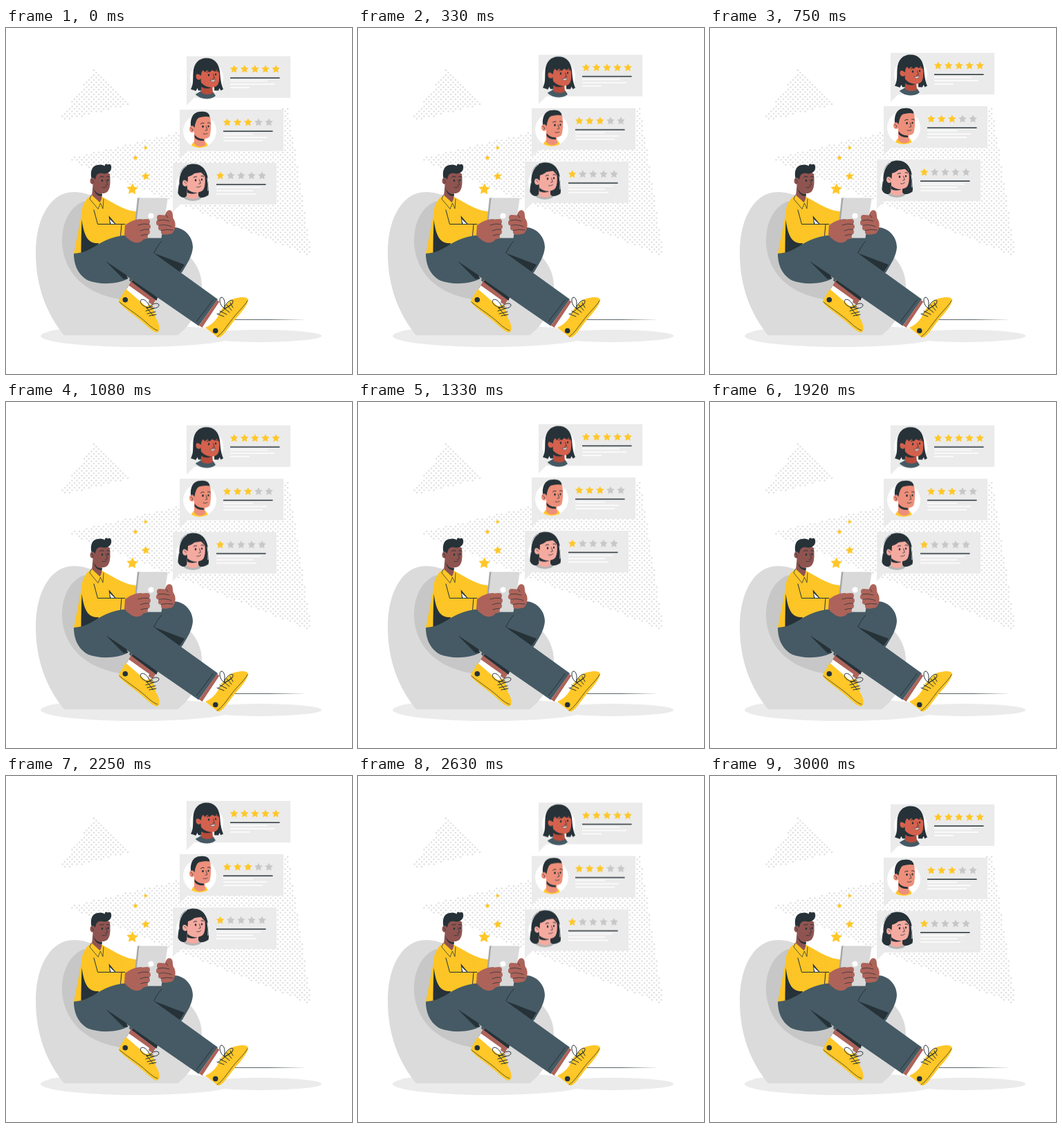
Recreate the animation shown at these times as an HTML page. Size 500 by 500 pixels, loop 3.04 s.

```html
<!DOCTYPE html>
<html lang="en">
<head>
<meta charset="utf-8">
<title>Customer reviews</title>
<style>
html, body { margin: 0; width: 100%; height: 100%; overflow: hidden; background: #fff; }
svg { display: block; width: 100vw; height: 100vh; }
.ink { fill: #263238; }
.pants { fill: #455a64; }
.sun { fill: #ffc727; }
.skin { fill: #ad6359; }
.face { fill: #8f5450; }
.line { fill: none; stroke: #263238; stroke-width: 1; stroke-linecap: round; stroke-linejoin: round; }
.thin { stroke-width: .75; }
.fingers { fill: none; stroke: #ad6359; stroke-width: 8; stroke-linecap: round; }
.dots { fill: none; stroke: #e0e0e0; stroke-width: 2.7; stroke-linecap: round; }
</style>
</head>
<body>
<svg viewBox="0 0 500 500" xmlns="http://www.w3.org/2000/svg">
  <defs>
    <pattern id="plaid" width="3" height="3" patternUnits="userSpaceOnUse">
      <path d="M0 .5H3M.5 0V3" stroke="#d99f10" stroke-width=".5" opacity=".22"/>
    </pattern>
  </defs>

  <g id="dots"></g>
  <ellipse cx="190" cy="445" rx="140" ry="16" fill="#ebebeb"/>
  <ellipse cx="367" cy="445" rx="89" ry="9" fill="#ebebeb"/>
  <path class="ink" d="M326 421.1L380 421L434 421.400L380 421.800L326 421.700Z"/>

  <g id="cards"></g>

  <!-- beanbag -->
  <path fill="#dbdbdb" d="M84 444C60 415 43 375 43 325C43 272 66 237 98 237C150 237 185 300 230 310C262 318 284 345 283 375C282 402 268 430 248 444Z"/>
  <path fill="#c7c7c7" d="M113 250C88 260 80 288 81 312C84 352 112 386 172 393L205 360Z"/>

  <!-- shirt -->
  <path id="torso" class="sun" d="M123 242C112 249 109 261 108.500 273L98 326L175 322L190 290L189 265C175 265 160 256 139 244Z"/>
  <path d="M123 242C112 249 109 261 108.500 273L98 326L175 322L190 290L189 265C175 265 160 256 139 244Z" fill="url(#plaid)"/>
  <path class="ink" d="M109.500 277C109 295 108.500 310 108.500 326L130 320L134 311C119 312 113 302 109.500 277Z"/>
  <path class="ink" d="M148.500 271L150 283H158.500Z"/>
  <path fill="#fff" d="M149.800 276L151.500 283H157Z"/>
  <path class="line" d="M127 263L132.500 283.500H172M167 284L165.500 301"/>

  <!-- head -->
  <path class="face" d="M126 222L124 243C127 250 134 256 138 250L139 236Z"/>
  <path class="ink" d="M126.500 231C129 238 134 241 139 240L138.500 243C132 243 128 239 126.500 231Z"/>
  <path class="face" d="M128 211C134 207 146 207 150 211C151 222 151 231 147 236C141 242 132 239 128 230Z"/>
  <ellipse class="face" cx="125.500" cy="221" rx="4" ry="5"/>
  <path class="ink" d="M123.500 217C121.500 208 124 199 132 198C137 196.500 141 198 143 199.500C142 196 146 195.500 147.500 198C150 194.500 154 199 151.500 205C149 210.500 143 211 139 210C132 209 130 213 129 219Q126 215 123.500 217Z"/>
  <path class="line thin" d="M124 219L126.500 222.500L125 224M144.500 219L146.500 226.500L143.500 227.500M139 230.500Q143 231.500 145.500 229.500"/>
  <path class="line" d="M136 215.500Q138.500 213.500 141 215M145.500 215Q148 213.500 150 215.500M147 201Q149 200 148 197"/>
  <ellipse class="ink" cx="139" cy="220.500" rx="1.200" ry="1.700"/>
  <ellipse class="ink" cx="147.500" cy="219.800" rx="1.100" ry="1.600"/>
  <path class="sun" d="M123.500 241L121 247L133 261.500L136.500 253Z"/>
  <path class="sun" d="M139.500 244L135 254L139 261L141.500 250Z"/>
  <path class="line thin" d="M123.500 241L121 247L133 261.500L136.500 253L140 261L141 247"/>

  <!-- far leg and foot -->
  <path class="pants" d="M196 304C212 296 225 290 240 288C256 287 270 300 270 317C269 330 262 340 255 352L216 393L178 365Z"/>
  <path class="ink" d="M213 325L258 342L250 354Z"/>
  <path class="skin" d="M183 362L218 390L212 400L175 376Z"/>
  <path class="ink" d="M184 363L219 389.500L217.500 394L181.500 367Z"/>
  <path fill="#fff" d="M177.500 372L207 393L204 403L172 382Z"/>
  <g id="shoeLeft">
    <path class="sun" d="M173 377L163 394C162 399 180 411 190 419C201 428 213 440 218 440C224 438 222 428 217 420C215 412 214 405 210 400L202 402Z"/>
    <path class="line thin" d="M164 396C178 407 195 418 203 426Q214 436 219 437"/>
    <circle class="ink" cx="172.300" cy="392.700" r="3.800"/>
    <path class="line" d="M207 404C199 404 192 397 195 393C199 390 205 396 208 403C212 397 220 397 221 400C221 405 213 406 208 404M203 405L212 402M202 409L214 405M204 413L216 410M207 416L217 414M203 404L213 416"/>
  </g>

  <!-- near leg and foot -->
  <path class="pants" d="M98 326C98 342 104 357 119 365C135 371 160 371 177 362L172 357L278.500 430.500L306 392L213 325L208 308C200 302 190 299 182 299C165 299 150 303 136 311C124 318 115 325 98 326Z"/>
  <path class="ink" d="M144 337L174 357L176 362L170 363Z"/>
  <path class="line" d="M214 325C217 318 221 312 225 308M299.500 392.500L275.500 424"/>
  <path class="skin" d="M305 393L309 396L284 433L279 430Z"/>
  <path fill="#fff" d="M308 396L317 403L296 438L284 432Z"/>
  <g id="shoeRight">
    <path class="sun" d="M288 433L306 447C311 449 318 438 325 429C334 417 350 402 350 392C347 387 335 389 327 392C321 395 317 402 311 407C306 419 300 428 288 433Z"/>
    <path class="line thin" d="M305 446C312 442 319 431 326 422C333 412 345 402 349 394"/>
    <circle class="ink" cx="302.700" cy="437.500" r="3.800"/>
    <path class="line" d="M315 405C309 401 307 391 311 389C316 389 317 398 315 405C317 398 325 391 328 394C329 400 320 404 315 405M309 409L319 414M314 404L323 411M319 400L326 408M324 397L328 404M305 413L315 417M306 414L327 398"/>
  </g>

  <!-- tablet and hands -->
  <path fill="#a6a6a6" d="M190 245.500H194L187 303H184Z"/>
  <path fill="#d9d9d9" d="M192.500 245.500H231.500Q234 245.500 233.500 248L224.500 303.500H186Z"/>
  <circle cx="209.500" cy="271.500" r="4" fill="#fff"/>
  <g id="handLeft">
    <path class="skin" d="M172 285C180 279 188 276 196 276L200 304C193 314 182 312 171 299Z"/>
    <path class="fingers" d="M192 281L204 280M192 288L205 287M192 294L204 294.500M192 301L201 301"/>
    <path class="line thin" d="M206 283.500Q198 282 191 285M207 291Q200 290 194 293M205 298.500Q200 298 195 300"/>
  </g>
  <g id="handRight">
    <path class="skin" d="M230 271C231 262 239 261 240.500 267L241.500 275C246 280 246 291 240 297L230 299Z"/>
    <path class="fingers" d="M222 274L235 275M221 281.500L238 282M224 288.500L239 288M228 294.500L237 293"/>
    <path class="line thin" d="M219 278Q228 276 236 279M221 285.500Q231 283 239 287M224 292.500Q232 290 241 292M231 270L234 274"/>
  </g>

  <g id="sparks"></g>
</svg>

<script>
const $ = id => document.getElementById(id);
const YELLOW = '#ffc727', GREY = '#c7c7c7', INK = '#263238';

function star(x, y, r, fill, turn = 0) {
  const pts = Array.from({ length: 10 }, (_, i) => {
    const a = (i * 36 - 90 + turn) * Math.PI / 180, d = i % 2 ? r * .5 : r;
    return (x + d * Math.cos(a)).toFixed(2) + ',' + (y + d * Math.sin(a)).toFixed(2);
  });
  return `<polygon points="${pts.join(' ')}" fill="${fill}" stroke="${fill}" stroke-width=".4" stroke-linejoin="round"/>`;
}

// Staggered dots whose centres lie inside a triangle
function dots([a, b, c]) {
  const side = (p, q, x, y) => (q[0] - p[0]) * (y - p[1]) - (q[1] - p[1]) * (x - p[0]) >= 0;
  const gap = 7;
  let d = '';
  for (let row = 0, y = 61; y < 334; y += gap / 2, row++)
    for (let x = 71 + (row % 2) * gap / 2; x < 446; x += gap)
      if (side(a, b, x, y) && side(b, c, x, y) && side(c, a, x, y))
        d += `M${x} ${y}h0`;
  return `<path class="dots" d="${d}"/>`;
}

const eyes = (x1, y1, x2, y2) => `
  <ellipse cx="${x1}" cy="${y1}" rx="1.3" ry="1.7" fill="${INK}"/>
  <ellipse cx="${x2}" cy="${y2}" rx="1.2" ry="1.6" fill="${INK}"/>
  <path class="line" d="M${x1 - 3} ${y1 - 4}q2-2 4.500-1M${x2 - 1} ${y2 - 5}q2.500-.8 3.800 .8"/>
  <path class="line thin" d="M${x2 - 3.5} ${y2}l1.800 5.500l-2.800 .8"/>`;

// Portraits, measured from the top left of their card; cy is the centre of the disc
const portraits = [
  { cy: 37.5, art: clip => `
   <path fill="${INK}" d="M9.500 24C10 10 18 2.500 28.500 2.500C40 2.500 46.500 10 48 22C49 34 50 41 53 47.500L49.500 49.500L47.500 46L46 49.500H40V40H25L24 49.500H17L15.500 46L13.500 50L6 47.500C10 41 9 33 9.500 24Z"/>
   <g clip-path="url(#${clip})">
     <path fill="#455a64" d="M11 56L21 50L38 51L42 57L34 63H20Z"/>
     <path fill="#b84c3c" d="M21 36L21 52Q28 58 38 53L37 42Z"/>
   </g>
   <path fill="#d4614d" d="M19 18L45 16C48 25 48 36 45 41C40 48 27 45 21 38Z"/>
   <ellipse cx="17.500" cy="29" rx="4" ry="5" fill="#d4614d"/>
   <path fill="${INK}" d="M11 26C11 10 20 4 31 5C42 6 46 14 47.500 24L43 19L41 22L37 20L33 23L30 20L26 23L24 20Q21 22 21 28Q16 24 11 26Z"/>
   <path fill="${INK}" d="M21 38Q27 45 36 45Q28 48.500 21 44Z"/>
   ${eyes(32, 27, 42, 26)}
   <path fill="#fff" stroke="${INK}" stroke-width=".5" d="M34 34.500Q38 35.500 41.500 33Q40.500 37 37.500 36.800Q35 36.500 34 34.500Z"/>` },

  { cy: 31, art: clip => `
   <g clip-path="url(#${clip})">
     <path class="sun" d="M13 58L20 46.500L38 47L44 58Z"/>
     <path fill="#ed8f7a" d="M21 34L21 49Q28 57 37 51L36 40Z"/>
   </g>
   <path fill="${INK}" d="M21.500 36Q26 42.500 35 42.500L35 45Q25 45.500 21.500 40Z"/>
   <path fill="#ed8f7a" d="M20 13C27 7 39 6 44 11C46 21 45 34 43 39C37 45 25 42 21 35Z"/>
   <ellipse cx="18" cy="28" rx="4" ry="5" fill="#ed8f7a"/>
   <path fill="${INK}" d="M16 24C15 11 20 3 30 3C38 2 43 5 43.500 10.500Q36 9 28 11.500Q23 14 21.500 26Q19 22 16 24Z"/>
   <path class="line thin" d="M16 26L19 29L17.500 31M34 35Q38 36 40 34.500"/>
   ${eyes(33.5, 24.5, 41.5, 24)}` },

  { cy: 31, art: clip => `
   <path fill="${INK}" d="M9 27C9 10 17 1.500 30 1.500C44 1.500 51 13 51.500 29C52 37 52.500 43 51.500 46.500Q46 50.500 39 50.500H18Q10 50 7.500 44C7.500 37 9 33 9 27Z"/>
   <path class="line" style="stroke:#fff" d="M9 31C8 20 12 9 20 4M50 22Q52 31 51 40"/>
   <g clip-path="url(#${clip})">
     <path fill="#b5b5b5" d="M14 53L20 47.500H37L42 53L34 60H20Z"/>
     <path fill="#f5aaa0" d="M21 36L20 49Q27 55 37 50L37 42Z"/>
   </g>
   <path fill="#f5aaa0" d="M19 17L45 13C48 24 47 34 44 39C38 45 26 43 21 37Z"/>
   <ellipse cx="18" cy="29" rx="4" ry="5" fill="#f5aaa0"/>
   <path fill="${INK}" d="M12 27C12 11 22 5 32 6C41 6 46 12 46.500 20Q41 12 35 11Q30 18 22 20L21.500 28Q17 22 12 27Z"/>
   <path fill="${INK}" d="M21 38Q27 43.500 36 43Q28 46.500 21 43Z"/>
   <path class="line thin" d="M16.500 27L19.500 30M34.500 35Q38 36 40.500 33.500"/>
   ${eyes(33, 25, 42, 24)}` }
];

function card(i, rating, widths) {
  const { cy, art } = portraits[i], clip = 'disc' + i;
  const stars = [68.6, 83.7, 98.8, 113.9, 129]
    .map((x, n) => star(x, 18.6, 5.6, n < rating ? YELLOW : GREY)).join('');
  const text = widths.map((w, n) => `M63 ${35.5 + n * 4.7}h${w}`).join('');
  return `<g transform="translate(${261 - i * 10} ${41 + i * 77})">
    <clipPath id="${clip}"><circle cx="29" cy="${cy}" r="24"/></clipPath>
    <path fill="#ebebeb" d="M0 0H150V60H11L0 71Z"/>
    <circle cx="29" cy="31" r="24" fill="#fff"/>
    ${art(clip)}${stars}
    <path d="M63 31.200h71.500" stroke="${INK}" stroke-width="1.400"/>
    <path d="${text}" stroke="#fff" stroke-width="1.500"/>
  </g>`;
}

$('dots').innerHTML =
  dots([[127, 60], [178, 111], [75, 136]]) + dots([[408, 114], [442, 331], [87, 189]]);
$('cards').innerHTML =
  card(0, 5, [54, 64, 28]) + card(1, 3, [43, 63, 57]) + card(2, 1, [64, 53, 58]);
$('sparks').innerHTML =
  star(182.5, 233, 8.3, YELLOW, 4) + star(202, 214.3, 5.8, YELLOW, -4) +
  star(187, 187.5, 3.5, YELLOW, 8) + star(201.7, 173, 2.8, YELLOW);

const LOOP = 3040;
const steps = [[0, 0], [1500, -10], [3000, 0], [LOOP, 0]];
$('cards').animate(
  steps.map(([t, y]) => ({ offset: t / LOOP, transform: `translateY(${y}px)` })),
  { duration: LOOP, iterations: Infinity, easing: 'linear' }
);
</script>
</body>
</html>
```
